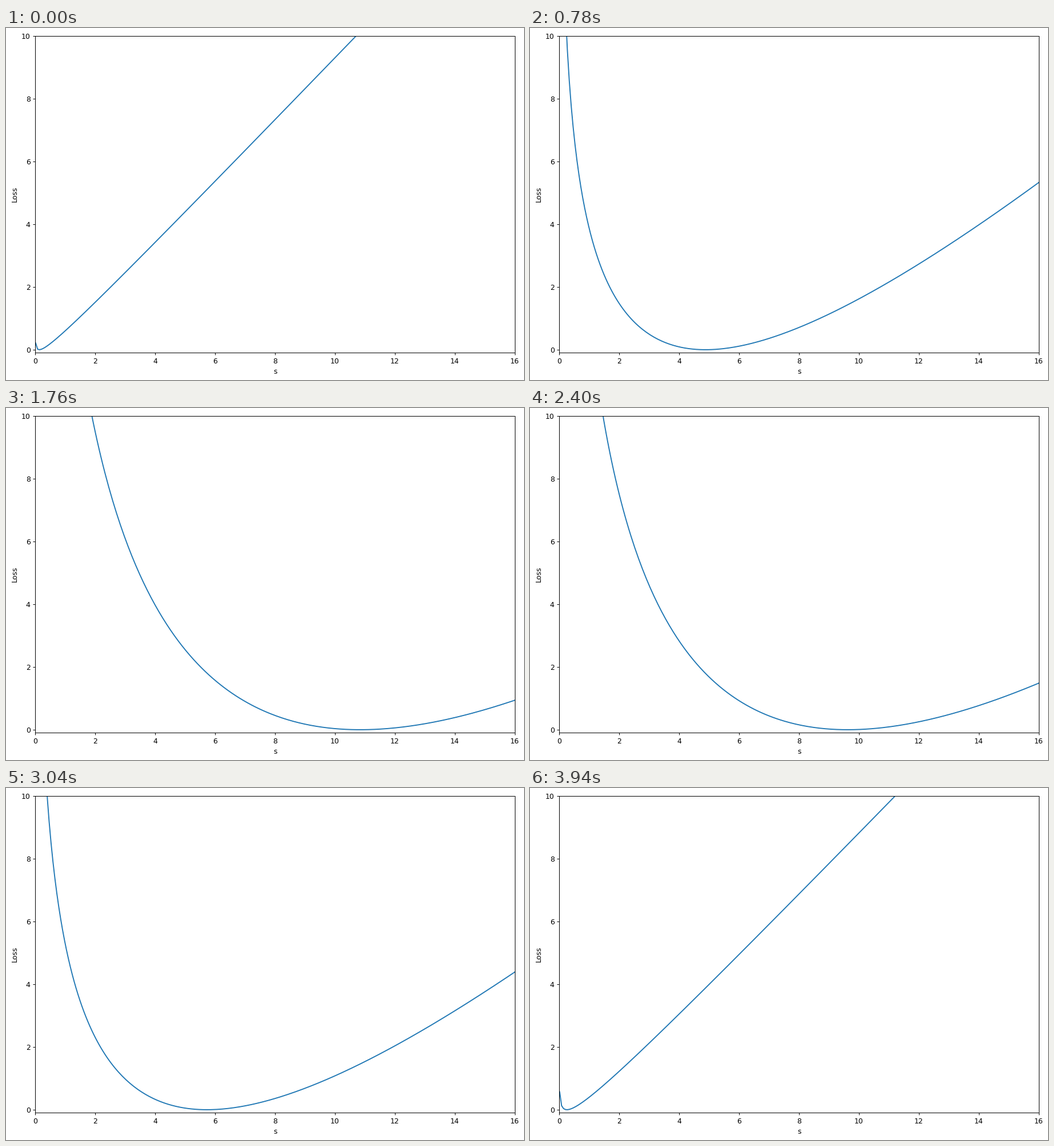
These frames come from a looping animation (907 px wide and 617 px high, 3960 ms). A matplotlib script:

```python
import numpy as np
import matplotlib.pyplot as plt
from matplotlib.animation import FuncAnimation

W, H, DPI = 907, 617, 90
LEFT, RIGHT, TOP, BOTTOM = 51.4, 890.9, 13.9, 569.4  # axes edges in pixels
PEAK = 99                # frames from the lowest minimum to the highest
START, STEP = 0.13, 0.1217

plt.rcParams["font.family"] = "DejaVu Sans"
plt.rcParams["font.size"] = 10

s = np.linspace(0.01, 16, 250)


def loss(target):
    """Generalised Kullback-Leibler divergence of s from the target."""
    return target * np.log(target / s) - target + s


def target_at(frame):
    """Triangle wave: steady rise to the peak, then steady fall."""
    return START + STEP * (PEAK - abs(frame - PEAK))


fig = plt.figure(figsize=(W / DPI, H / DPI), dpi=DPI, facecolor="white")
ax = fig.add_axes([LEFT / W, 1 - BOTTOM / H, (RIGHT - LEFT) / W, (BOTTOM - TOP) / H])
ax.set_xlim(0, 16)
ax.set_ylim(-0.1, 10)
ax.set_xlabel("s")
ax.set_ylabel("Loss")
curve, = ax.plot(s, loss(target_at(0)), color="tab:blue", lw=1.5)


def update(frame):
    curve.set_ydata(loss(target_at(frame)))
    return curve,


anim = FuncAnimation(fig, update, frames=2 * PEAK, interval=20, repeat=True, repeat_delay=0)
plt.show()
```
